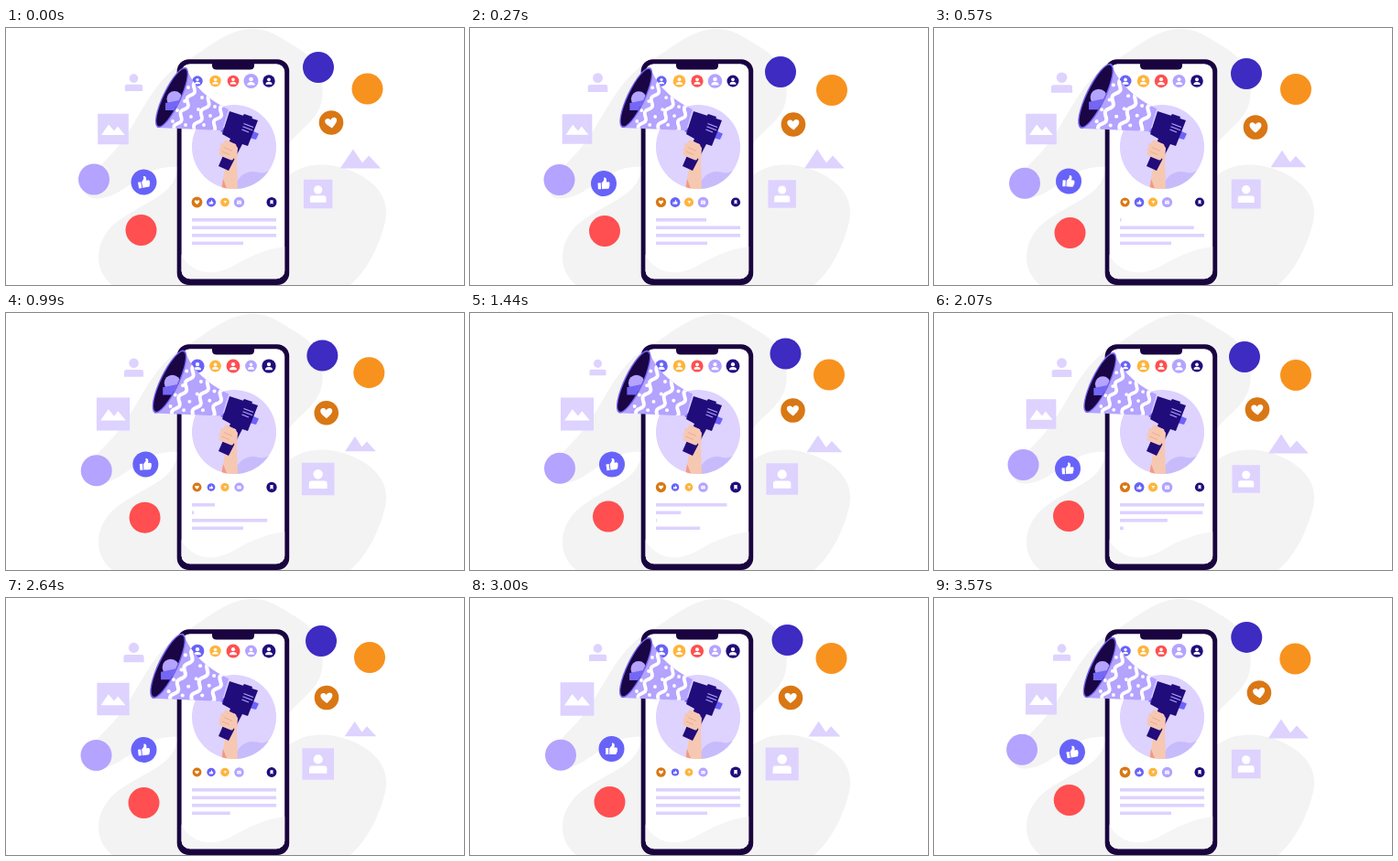
These frames come from a looping animation (500 by 281 pixels, 3600 ms). An HTML page:

```html
<!DOCTYPE html>
<html lang="en">
<head>
<meta charset="utf-8">
<title>Social phone</title>
<style>
html, body { margin: 0; width: 100%; height: 100%; overflow: hidden; background: #fff; }
svg { display: block; width: 100vw; height: 100vh; }
</style>
</head>
<body>
<svg id="stage" viewBox="0 0 500 281">
  <defs>
    <clipPath id="photo"><circle cx="249" cy="130" r="46"/></clipPath>
    <clipPath id="mouth"><ellipse rx="8.6" ry="34.5" transform="translate(181 76) rotate(25.5)"/></clipPath>
    <clipPath id="cone"><path d="M197 43C203 63 222 79 243 89L236 112L165 109Z"/></clipPath>
    <clipPath id="screen"><rect x="191.6" y="39.2" width="112.600" height="235" rx="9"/></clipPath>
  </defs>

  <g fill="#f3f3f3">
    <path d="M268 1C290 1 301 12 317 21C341 35 348 55 345 78C341 100 324 108 309 126L250 160L187 152C160 150 145 166 125 178C107 189 90 189 87 180C84 168 101 153 116 137C143 108 155 65 187 42C218 25 238 2 268 1Z"/>
    <path d="M187 155C183 184 150 190 121 212C99 229 92 262 116 281H376C394 265 407 240 414 212C420 184 401 167 379 157C354 146 326 147 309 161Z"/>
  </g>

  <rect x="186.700" y="34.300" width="122.500" height="246.700" rx="13" fill="#19043f"/>
  <g clip-path="url(#screen)">
    <rect x="191" y="39" width="114" height="237" fill="#fff"/>
    <path d="M191 247C202 270 228 272 248 260C270 247 288 241 305 239V276H191Z" fill="#f5f5f5"/>
  </g>
  <path d="M225 38H271V41Q271 45.500 266 45.500H230Q225 45.500 225 41Z" fill="#19043f"/>

  <g id="lines" fill="#ded2ff"></g>
  <g id="dots"></g>

  <g clip-path="url(#photo)">
    <rect x="203" y="84" width="92" height="92" fill="#ded2ff"/>
    <path d="M248 177C252 163 262 154 276 158C284 160 288 154 296 154V177Z" fill="#c8bbfb"/>
  </g>

  <path d="M238 109L246 111L243 117L234 113Z" fill="#6d64fb"/>
  <g id="horn">
    <path d="M197 43C203 63 222 79 243 89L236 112L165 109Z" fill="#b4a3ff"/>
    <g id="pattern" clip-path="url(#cone)" fill="#fff"></g>
    <ellipse rx="10" ry="36.300" transform="translate(181 76) rotate(25.500)" fill="#7467ee"/>
    <ellipse rx="8.600" ry="34.500" transform="translate(181 76) rotate(25.500)" fill="#1a0545"/>
    <g clip-path="url(#mouth)">
      <circle cx="184" cy="77.500" r="8.500" fill="#b4a3ff"/>
      <path d="M174 82L194 78V90H174Z" fill="#7467f4"/>
    </g>
  </g>

  <g clip-path="url(#photo)">
    <path d="M235 178L239 154L246 140L249 127L253 131L252 145L253 178Z" fill="#f6c8b2"/>
    <path d="M235 178L237 165L242 178Z" fill="#f39a82"/>
  </g>
  <path d="M268 112L276 115.500L273 122L265 120Z" fill="#6d64fb"/>
  <path d="M258 97L260 94L269 97L268 101ZM244 91L275 101L264 129L258 127L243 156L232 151L245 121L236 116Z" fill="#210c7b"/>
  <path d="M259.500 104.500L270 108.500M258.500 107.800L269 111.800M257.500 111L265 114" stroke="#b4a3ff" stroke-width="1.200"/>
  <path d="M246 140L252 146L253 131L249 126Z" fill="#f6c8b2"/>
  <path d="M240.500 125L249 129M236.500 128.500L248 134M235 133L247 138M235 137.500L246 142" stroke="#f6c8b2" stroke-width="4.800" stroke-linecap="round"/>
  <path d="M238 130.500L247 134.500M236 135L244 138.500" stroke="#e89f89" stroke-width=".7"/>

  <g id="floats"></g>
</svg>
<script>
const LOOP = 3600, SWAY = 1800;
const KEYS = [0, 270, 570, 840, 1200, 1440];
const $ = id => document.getElementById(id);

function add(parent, tag, attrs, html = '') {
  const el = document.createElementNS('http://www.w3.org/2000/svg', tag);
  for (const k in attrs) el.setAttribute(k, attrs[k]);
  el.innerHTML = html;
  parent.appendChild(el);
  return el;
}

// Smooth closed curve through values placed at KEYS
function sway(v, t) {
  t %= SWAY;
  const n = KEYS.length;
  const time = i => KEYS[(i + n) % n] + SWAY * Math.floor(i / n);
  const val = i => v[(i + n) % n];
  const slope = i => (val(i + 1) - val(i - 1)) / (time(i + 1) - time(i - 1));
  let i = n - 1;
  while (KEYS[i] > t) i--;
  const d = time(i + 1) - time(i), u = (t - time(i)) / d, w = 1 - u;
  return val(i) * w * w * (1 + 2 * u) + val(i + 1) * u * u * (3 - 2 * u)
    + d * u * w * (slope(i) * w - slope(i + 1) * u);
}

const pulse = (base, amp, peak, t, period = SWAY) =>
  base + amp * Math.cos(2 * Math.PI * (t - peak) / period);

const ease = x => {
  x = Math.min(1, Math.max(0, x));
  return (1 - Math.cos(Math.PI * x)) / 2;
};

const HEART = '<path d="M0 6C-5 2-6.500 0-6.500-2.300C-6.500-5.500-2-6.500 0-3C2-6.500 6.500-5.500 6.500-2.300C6.500 0 5 2 0 6Z" fill="#fff"/>';
const THUMB = '<path transform="scale(.92)" d="M-7-1H-3.500V6.500H-7ZM-2.500-.5L.5-4V-7Q4-7.500 3.500-3L3-1.500H6Q8 0 6.800 1.500Q7.500 3 6.200 4Q6.500 6.500 4 6.500H-2.500Z" fill="#fff"/>';
const PLANE = '<path d="M-5-4L6-4L0 6L-1 0Z" fill="#fff"/>';
const MAIL = '<path d="M-6-4.500H6V5H-6Z" fill="#fff"/><path d="M-5-3L0 1L5-3" fill="none" stroke="#b4a3ff" stroke-width="1.500"/>';
const MARK = '<path d="M-4-6H4V6L0 3L-4 6Z" fill="#fff"/>';
const USER = '<circle cy="-3.500" r="4" fill="#fff"/><path d="M-7.500 8Q-7.500 1.800 0 1.800Q7.500 1.800 7.500 8Z" fill="#fff"/>';
const disc = (fill, r, icon = '') => `<circle r="${r}" fill="${fill}"/>` + icon;

const LILAC = '#b4a3ff', BLUE = '#6863f8', NAVY = '#210c7b', OCHRE = '#d97714',
      YELLOW = '#ffb43c', RED = '#ff4f50', PALE = '#ded2ff';

// Badges that pulse in place: x, y, colour, icon, radius, swing, peak, period
const dots = [
  [209, 58, BLUE, USER, 6.6, 1, 1050],
  [228.5, 58, YELLOW, USER, 6.6, .4, 400, 900],
  [248, 58, RED, USER, 6.9, .6, 850],
  [267.500, 58, LILAC, USER, 7.2, .8, 50],
  [287, 58, NAVY, USER, 7.1, .6, 1150],
  [208.500, 190.500, OCHRE, HEART, 5.4, .5, 1750],
  [224, 190.500, BLUE, THUMB, 4.8, .7, 350],
  [239, 190.500, YELLOW, PLANE, 4.75, .4, 400],
  [254.500, 190.500, LILAC, MAIL, 5.45, .4, 250],
  [290, 190.500, NAVY, MARK, 5.5, .5, 1350]
].map(([x, y, fill, icon, r, amp, peak, period]) => ({
  el: add($('dots'), 'g', {}, disc(fill, 14, icon)),
  x, y, size: t => pulse(r, amp, peak, t, period) / 14
}));

// Flat pale pictures that pulse around their centre
const PERSON = `<g fill="${PALE}"><circle cy="-5.500" r="5.800"/><path d="M-11.500 11V5Q-11.500 2.500-9 2.500H9Q11.500 2.500 11.500 5V11Z"/></g>`;
const FRAME = `<path d="M-17-17H17V17H-17Z" fill="${PALE}"/>`;
const PEAKS = 'M-22 10L-8-11L2 4L9-4L22 10Z';
[
  [139.5, 59.7, PERSON, .89, .11, 600],
  [117, 110.500, FRAME + '<path d="M-13 6.500L-5-5L1 2L5-3L13 6.500Z" fill="#fff"/>', 1.02, .06, 1200],
  [340.7, 181.500, FRAME + '<circle cy="-5" r="5" fill="#fff"/><path d="M-9.500 10V5Q-9.500 2-7 2H7Q9.500 2 9.500 5V10Z" fill="#fff"/>', .978, .082, 1150],
  [387, 143.500, `<path d="${PEAKS}" fill="${PALE}"/>`, .89, .125, 100]
].forEach(([x, y, art, base, amp, peak]) => dots.push({
  el: add($('floats'), 'g', {}, art), x, y, size: t => pulse(base, amp, peak, t)
}));

// Drifting badges
const floats = [
  { art: disc('#3d2bc2', 17),
    x: [341, 339, 341, 344, 346.5, 344.5], y: [43, 48, 50, 47, 46, 44.5] },
  { art: disc('#f8921e', 17),
    x: [394.5, 395, 395, 397, 394.5, 392], y: [66.5, 68, 67, 65, 66, 67.5] },
  { art: disc(LILAC, 17),
    x: [96, 97.5, 99, 98.5, 99, 98], y: [165.5, 166, 169.7, 172, 171.7, 169.7] },
  { art: disc(RED, 17),
    x: [147.5, 147, 148.5, 150.5, 152.5, 151], y: [221, 222, 224, 224, 223, 222.5] },
  { art: disc(BLUE, 14, THUMB), tilt: [-10, -3, 3, -6, 0, -8],
    x: [150.5, 146, 147, 150.5, 154.5, 155], y: [168.5, 170, 167.5, 166, 165, 165.5] },
  { art: disc(OCHRE, 13.3, HEART), tilt: [-10, -4, 0, -3, 2, -3],
    x: [355, 353, 351, 350, 350, 352.5], y: [103.5, 105.5, 108.5, 109, 109, 106.5] }
];
for (const f of floats) f.el = add($('floats'), 'g', {}, f.art);

const lines = [92, 92, 92, 56].map((full, i) => ({
  full, el: add($('lines'), 'rect', { x: 203, y: 208 + i * 8.5, height: 3.6 })
}));

// Wavy stripes and spots on the horn
function wave(x1, y1, x2, y2, humps) {
  const dx = x2 - x1, dy = y2 - y1, len = Math.hypot(dx, dy), pts = [];
  for (let i = 0; i <= 40; i++) {
    const u = i / 40, a = 2.4 * Math.sin(u * humps * 2 * Math.PI);
    pts.push([x1 + dx * u - dy / len * a, y1 + dy * u + dx / len * a].map(n => n.toFixed(1)));
  }
  add($('pattern'), 'polyline', {
    points: pts.join(' '), fill: 'none', stroke: '#fff', 'stroke-width': 3.8, 'stroke-linejoin': 'round'
  });
}
wave(209, 58, 184, 112, 3.5);
wave(225, 72, 204, 114, 2.7);
wave(238, 84, 224, 114, 2);
for (const [x, y] of [[199, 65], [195, 80], [187, 90], [182, 102], [214, 76], [210, 89], [202, 97], [196, 106], [228, 86], [223, 96], [216, 106]])
  add($('pattern'), 'circle', { cx: x, cy: y, r: 1.9 });

const HORN = [1, .995, 1.075, 1.075, 1, 1.04];

function draw(t) {
  for (const d of dots)
    d.el.setAttribute('transform', `translate(${d.x} ${d.y}) scale(${d.size(t)})`);
  for (const f of floats) {
    const turn = f.tilt ? sway(f.tilt, t) : 0;
    f.el.setAttribute('transform', `translate(${sway(f.x, t)} ${sway(f.y, t)}) rotate(${turn})`);
  }
  $('horn').setAttribute('transform', `translate(240 100) scale(${sway(HORN, t)}) translate(-240 -100)`);
  lines.forEach(({ el, full }, i) => {
    const u = t - i * 430;
    const part = u < 595 ? 1 - ease(u / 620) : Math.max(.01, ease((u - 590) / 1150));
    el.setAttribute('width', full * part);
  });
}

const start = performance.now();
function tick() {
  draw((performance.now() - start) % LOOP);
  requestAnimationFrame(tick);
}
tick();
</script>
</body>
</html>
```
